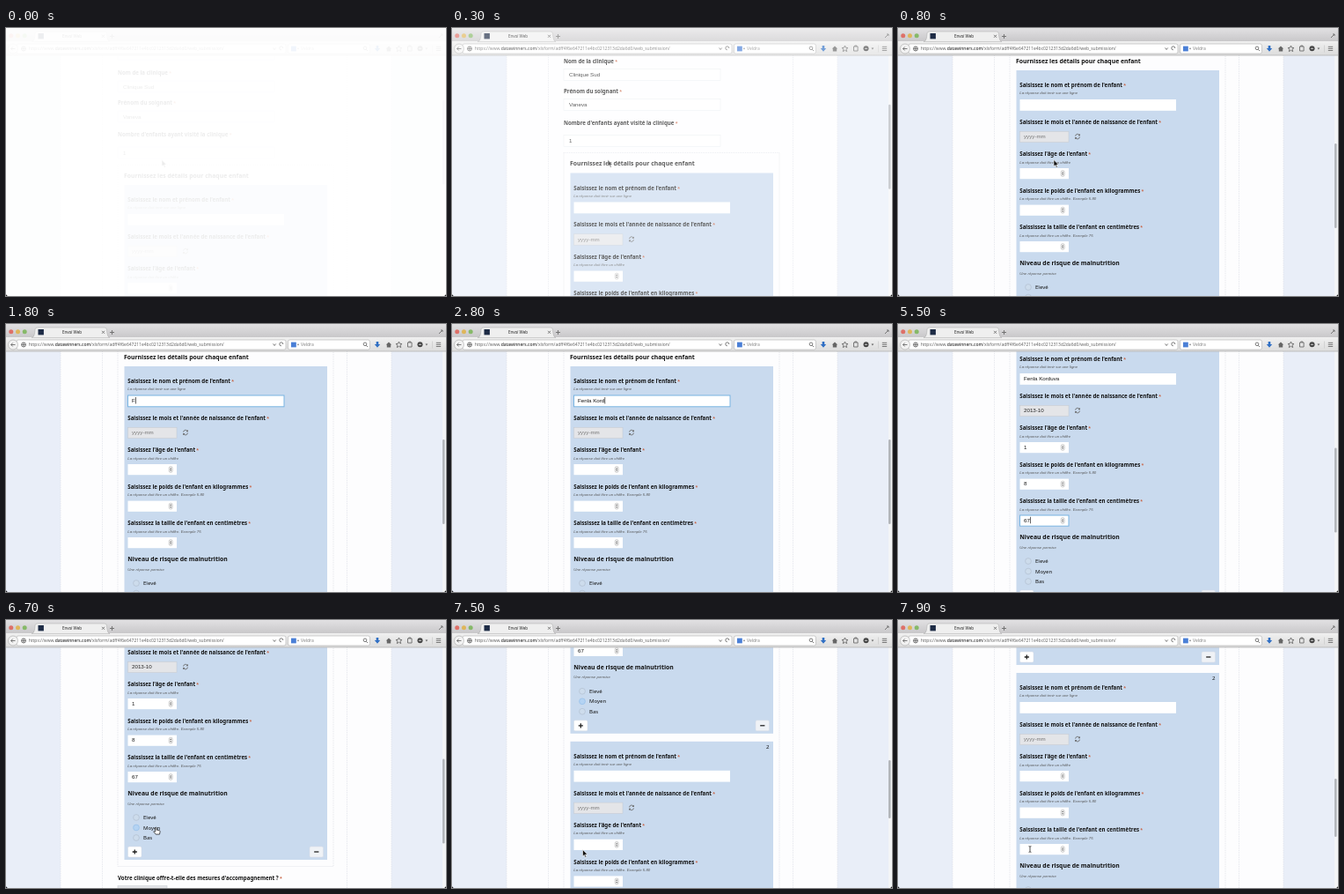
Recreate the animation shown at these times as an HTML page. Size 500x304 px, loop 8000 ms.

```html
<!DOCTYPE html>
<html lang="fr">
<head>
<meta charset="utf-8">
<title>Envoi Web</title>
<style>
html, body { margin: 0; width: 100%; height: 100%; overflow: hidden; background: #fff; }
svg { display: block; width: 500px; height: 304px; }
text { font-family: "Noto Sans", "Open Sans", sans-serif; fill: #111; white-space: pre; }
.head { font-size: 6.85px; font-weight: 700; }
.label { font-size: 6.13px; font-weight: 700; }
.star { fill: #c9603f; font-weight: 700; font-size: 5.2px; }
.hint { font: italic 4.37px "Liberation Sans", Arial, sans-serif; fill: #555; }
.value, .month { font: 6.2px "Liberation Sans", Arial, sans-serif; fill: #111; }
.month { font-size: 6px; text-anchor: middle; }
.bold { font-weight: 700; }
.option { font-size: 6px; }
.ui { font-size: 4.98px; fill: #666; }
.field { fill: #fff; }
.plain { stroke: #e4e7ec; stroke-width: .5; }
.date { fill: #e4e5e8; stroke: #c3c8d0; stroke-width: .5; }
.focus { stroke: #79b4e2; stroke-width: 1; }
.line { fill: none; stroke: #dcdfe6; stroke-width: .8; stroke-dasharray: 1 1; }
.icon { fill: none; stroke: #6b6b6b; stroke-width: .9; }
</style>
</head>
<body>
<svg viewBox="0 0 500 304" xmlns="http://www.w3.org/2000/svg">
  <defs>
    <linearGradient id="tabs" x2="0" y2="1"><stop stop-color="#e2e1e3"/><stop offset="1" stop-color="#c7c6c8"/></linearGradient>
    <linearGradient id="bar" x2="0" y2="1"><stop stop-color="#f0f0f0"/><stop offset="1" stop-color="#dcdcdc"/></linearGradient>
    <filter id="soft" x="-20%" y="-20%" width="140%" height="140%"><feDropShadow dx="0" dy="1" stdDeviation="1.5" flood-opacity=".35"/></filter>
  </defs>

  <rect width="500" height="304" fill="#e9eef8"/>
  <rect x="62" y="31" width="376" height="273" fill="#fdfdfe"/>
  <path class="line" d="M62 31V304M109.5 31V304M387.5 31V304M438 31V304"/>
  <g id="page"></g>

  <rect x="496" y="31" width="4" height="273" fill="#f3f4f6"/>
  <rect id="thumb" x="496" width="2.6" rx="1.3" fill="#b2b5ba"/>
  <g id="chrome"></g>

  <g id="arrow"><path d="M0 0V7.6L1.8 6L3 8.8L4.2 8.3L3 5.6H5.4Z" fill="#111" stroke="#fff" stroke-width=".6"/></g>
  <g id="hand"><path d="M-.7 .2Q0 -.6 .7 .2V2.6L4 3.3Q4.8 3.6 4.6 4.6L4 7.6H-.3L-2.8 4.4Q-2.4 3.4 -.7 4.6Z" fill="#fff" stroke="#111" stroke-width=".7"/></g>
  <g id="beam"><path d="M-1.4 -3.4Q0 -3.4 0 -2.6Q0 -3.4 1.4 -3.4M0 -2.6V2.6M-1.4 3.4Q0 3.4 0 2.6Q0 3.4 1.4 3.4" fill="none" stroke="#222" stroke-width=".8"/></g>

  <rect id="veil" width="500" height="304" fill="#fff"/>
  <path d="M0 302V304H2Q.4 303.6 0 302ZM500 302V304H498Q499.6 303.6 500 302Z"/>
</svg>

<script>
const $ = id => document.getElementById(id);
const text = (x, y, cls, str, extra = '') => `<text x="${x}" y="${y}" class="${cls}" ${extra}>${str}</text>`;
const label = (x, y, str) =>
  `<text x="${x}" y="${y}" class="label">${str}<tspan class="star" dx="1.2">*</tspan></text>`;
const field = (x, y, w, h, id = '', cls = '') =>
  `<rect x="${x}" y="${y}" width="${w}" height="${h}" class="field ${cls}" ${id && `id="${id}"`}/>`;
const slot = (id, y) => `<text x="143" y="${y}" class="value" id="${id}"></text>`;

// One numeric question: label, hint, field with spinner
const numeric = (key, y, title, example) =>
  label(138.3, y + 2.2, title) +
  text(138.3, y + 10.7, 'hint', 'La réponse doit être un chiffre' + example) +
  field(138.5, y + 16, 55.5, 12.2, key + 'Box') + slot(key, y + 23.8) +
  `<rect x="185.2" y="${y + 18.6}" width="4" height="6.8" rx="1.8" fill="#f1f1f1" stroke="#aaa" stroke-width=".5"/>
   <path d="M186.1 ${y + 21.4}l1.1 -1.5l1.1 1.5zM186.1 ${y + 22.6}l1.1 1.5l1.1 -1.5z" fill="#666"/>`;

const button = (x, sign, fill) =>
  `<rect x="${x}" y="327" width="15.5" height="12" rx="1.5" fill="${fill}" stroke="#d4dbe4" stroke-width=".5"/>
   <path d="M${x + 5.2} 333h5.2${sign === '+' ? 'm-2.6 -2.6v5.2' : ''}" stroke="#222" stroke-width="1.3"/>`;

// One block of questions about a child; n prefixes its ids
function child(n) {
  const radios = ['Elevé', 'Moyen', 'Bas'].map((name, i) => {
    const y = 294 + 11.5 * i;
    return `<circle cx="148" cy="${y}" r="3.4" fill="#cddcec" stroke="#b0bfd0" stroke-width=".7" id="${n}radio${i}"/>` +
      text(156, y + 2.2, 'option', name);
  }).join('');
  return `<rect x="134.5" y="48" width="230.5" height="294" fill="#c9daee"/>` +
    label(138.3, 67.2, "Saisissez le nom et prénom de l'enfant") +
    text(138.3, 75.4, 'hint', 'La réponse doit tenir sur une ligne') +
    field(138.5, 81, 177.5, 12.8, n + 'nameBox') + slot(n + 'name', 89) +
    label(138.3, 109, "Saisissez le mois et l'année de naissance de l'enfant") +
    field(138.5, 117.3, 55.5, 12.4, n + 'dateBox', 'date') + slot(n + 'date', 125.1) +
    `<path d="M201.6 122.6a2.4 2.4 0 0 1 4.4 -1.2M206.4 123.6a2.4 2.4 0 0 1 -4.4 1.2" class="icon"/>
     <path d="M206.9 119.9v2.4h-2.4zM201.1 126.3v-2.4h2.4z" fill="#666"/>` +
    numeric(n + 'age', 143, "Saisissez l'âge de l'enfant", '') +
    numeric(n + 'weight', 184.6, "Saisissez le poids de l'enfant en kilogrammes", '. Exemple 5.80') +
    numeric(n + 'height', 226, "Saississez la taille de l'enfant en centimètres", '. Exemple 75') +
    text(138.3, 268.8, 'head', 'Niveau de risque de malnutrition') +
    text(138.3, 279.7, 'hint', 'Une réponse permise') +
    radios + button(138.5, '+', '#fff') + button(345, '-', '#eff2f6');
}

const months = 'Jan Feb Mar Apr May Jun Jul Aug Sep Oct Nov Dec'.split(' ');
const picker = `<g id="picker">
  <path d="M140 131.5H143L145.5 129L148 131.5H224.5Q226 131.5 226 133V216.5Q226 218 224.5 218H140Q138.5 218 138.5 216.5V133Q138.5 131.5 140 131.5Z" fill="#fff" filter="url(#soft)"/>
  <rect id="hover" width="19" height="21" rx="2.5" fill="#e9e9ea"/>` +
  text(146, 140.4, 'month bold', '«') + text(182, 140.4, 'month bold', '2013') + text(218, 140.4, 'month bold', '»') +
  months.map((m, i) => text(152 + 20 * (i % 4), 159.6 + 22.8 * (i >> 2), 'month', m)).join('') + '</g>';

const intro = [[-79, 'Nom de la clinique', 'Clinique Sud'], [-45, 'Prénom du soignant', 'Vaneva'],
  [-9, "Nombre d'enfants ayant visité la clinique", '1']];

$('page').innerHTML =
  field(127, -107, 178, 13, '', 'plain') +
  intro.map(([y, title, value], i) => label(127, y + 2.2, title) +
    field(127, y + (i < 2 ? 9 : 14), 178, 13, '', 'plain') + text(133, y + (i < 2 ? 17.5 : 23), 'value', value)).join('') +
  `<rect id="outer" x="127" y="25" width="245" class="line"/>` +
  text(134, 39.6, 'head', 'Fournissez les détails pour chaque enfant') +
  child('a') +
  `<g id="second" transform="translate(0 303)">${child('b')}${text(357, 56, 'option', '2')}</g>` +
  text(339, 109, 'label', 'Required', 'id="required" style="font-size:5.3px"') +
  `<g id="after">${label(127, 365.3, "Votre clinique offre-t-elle des mesures d'accompagnement ?")}${field(127, 371.5, 56, 13, '', 'date')}</g>` +
  picker + '<rect id="caret" width=".7" height="7.5" fill="#222"/>';

$('chrome').innerHTML = `
  <rect width="500" height="16" fill="url(#tabs)"/>
  <rect y="15" width="500" height="16" fill="url(#bar)"/>
  <path d="M0 31H500" stroke="#b4b4b4" stroke-width=".8"/>
  <path d="M29 15.5Q32 15 32.5 11L33 6Q33.4 4 35.5 4H112Q114 4 114.4 6L115 11Q115.6 15 118 15.5Z" fill="#efefef" stroke="#aaa" stroke-width=".5"/>
  ${['#de7068', '#dfb65a', '#86b968'].map((c, i) => `<circle cx="${5.8 + 7.7 * i}" cy="8.8" r="2.5" fill="${c}"/>`).join('')}
  <rect x="36.5" y="6" width="6.4" height="6.4" fill="#1d2b45"/>
  <path d="M109 7.8l3 3m0 -3l-3 3M120.5 7v5m-2.5 -2.5h5M492 11l4 -4m-2 0h2v2" class="icon"/>
  ${text(64, 11.2, 'ui', 'Envoi Web', 'style="font-size:4.5px;fill:#222"')}
  <rect x="12" y="18" width="306" height="11" rx="2" fill="#fff" stroke="#b0b0b0" stroke-width=".6"/>
  <circle cx="8" cy="23.5" r="5.5" fill="#f2f2f2" stroke="#a8a8a8" stroke-width=".6"/>
  <path d="M10.5 23.5H5.7l2 -2m-2 2l2 2" class="icon"/>
  <circle cx="20" cy="23.5" r="2.5" class="icon"/><path d="M17.5 23.5h5M20 21v5" class="icon" stroke-width=".4"/>
  ${text(25.7, 25.2, 'ui', 'https://www.<tspan fill="#111">datawinners.com</tspan>/xlsform/adff4f6e647211e4bc0212313d2da6d0/web_submission/')}
  <path d="M303.5 22.5l1.6 2l1.6 -2M312.8 24.8a2 2 0 1 1 2 -1.8" class="icon"/>
  <rect x="320.5" y="18" width="93" height="11" rx="2" fill="#fff" stroke="#b0b0b0" stroke-width=".6"/>
  <rect x="324" y="20.6" width="5.8" height="5.8" fill="#4a7fd6"/>
  <path d="M330.8 22.8l1.2 1.6l1.2 -1.6z" fill="#777"/>
  ${text(335, 25.3, 'ui', 'Veldra', 'fill-opacity=".8"')}
  <circle cx="408" cy="22.8" r="1.8" class="icon"/><path d="M409.3 24.2l1.8 1.9" class="icon"/>
  <path d="M420.7 20h2.6v3h1.9l-3.2 3.7l-3.2 -3.7h1.9z" fill="#2f6fc4"/>
  <path d="M431.8 23.6l3.2 -3.2l3.2 3.2h-1v3h-4.4v-3z" fill="#666"/>
  <path d="M446.5 20l1 2.3l2.5 .2l-1.9 1.6l.6 2.5l-2.2 -1.3l-2.2 1.3l.6 -2.5l-1.9 -1.6l2.5 -.2z" class="icon" stroke-width=".7"/>
  <path d="M456.5 21h4.6v5h-4.6zm1.2 0v-1h2.2v1" class="icon"/>
  <circle cx="470.5" cy="23.3" r="3" fill="#444"/><path d="M469.1 23.3h2.8" stroke="#fff" stroke-width=".8"/>
  <path d="M476.5 22.6l1.4 1.8l1.4 -1.8z" fill="#666"/>
  <path d="M484.5 19.5v8" stroke="#c4c4c4" stroke-width=".6"/>
  <path d="M488.8 21.3h5.4m-5.4 2.1h5.4m-5.4 2.1h5.4" class="icon"/>`;

// Tracks are [time, value...]; values glide between neighbours
const scrolls = [[0, -130], [200, -130], [700, 0], [5200, 0], [5400, 25], [5700, 25], [6200, 70], [7200, 70], [7700, 291]];
const moves = [[0, 177, 149.5], [900, 177, 149.5], [1300, 170, 88], [3300, 170, 88], [3900, 158, 124], [4200, 158, 124],
  [4600, 165, 167.5], [4900, 172, 201], [5800, 180, 200], [6400, 170.5, 235.5], [6700, 170.5, 235.5],
  [7100, 147, 261], [7300, 147, 261], [7700, 150, 260]];
const veils = [[0, .92], [500, 0]];

function at(track, t, k = 1) {
  const i = track.findIndex(p => p[0] > t);
  if (i < 0) return track[track.length - 1][k];
  const [a, b] = [track[i - 1], track[i]];
  const u = (t - a[0]) / (b[0] - a[0]);
  return a[k] + (b[k] - a[k]) * u * u * (3 - 2 * u);
}

// Steps are [start, value]; the last one begun holds
const step = (list, t) => list.filter(p => p[0] <= t).pop()[1];
const focuses = [[0, ''], [1400, 'aname'], [4000, 'adate'], [5000, ''], [5100, 'aage'], [5200, 'aweight'], [5300, 'aheight'], [6600, '']];
const pointers = [[0, 'arrow'], [1200, 'beam'], [1600, ''], [3300, 'beam'], [3500, 'arrow'], [3800, 'beam'],
  [4300, 'hand'], [5100, ''], [5800, 'arrow'], [6300, 'hand'], [6800, 'arrow'], [7000, 'hand'], [7300, 'arrow'], [7600, 'beam']];
const fullName = 'Fenla Korduva';
const show = (id, on) => $(id).style.display = on ? '' : 'none';
const place = (id, x, y) => $(id).setAttribute('transform', `translate(${x} ${y})`);
const set = (id, attrs) => Object.entries(attrs).forEach(([k, v]) => $(id).setAttribute(k, v));

function draw(t) {
  const scroll = at(scrolls, t), added = t >= 7200;
  place('page', 0, -scroll);
  set('thumb', added ? { y: 180 - .27 * (291 - scroll), height: 66 } : { y: 131 + .38 * scroll, height: 96 });
  set('outer', { height: added ? 627.5 : 324.5 });
  show('second', added);
  place('after', 0, added ? 303 : 0);

  const picked = t >= 5000;
  const values = {
    aname: fullName.slice(0, Math.max(0, Math.floor((t - 1600) / 120))),
    adate: picked ? '2013-10' : 'yyyy-mm',
    aage: t >= 5100 ? '1' : '',
    aweight: t >= 5200 ? '8' : '',
    aheight: t >= 5400 ? '67' : t >= 5300 ? '6' : '',
    bdate: 'yyyy-mm'
  };
  for (const id in values) $(id).textContent = values[id];
  $('adate').style.fill = picked ? '#222' : '#777';
  $('bdate').style.fill = '#777';

  const active = step(focuses, t);
  for (const id of ['aname', 'adate', 'aage', 'aweight', 'aheight']) $(id + 'Box').classList.toggle('focus', id === active);
  show('caret', active);
  if (active) {
    const el = $(active);
    const typed = active !== 'adate' && values[active] ? el.getComputedTextLength() : 0;
    set('caret', { x: 143.2 + typed, y: el.getAttribute('y') - 6 });
  }

  const open = t >= 4000 && !picked;
  show('picker', open);
  show('required', open);
  set('hover', t < 4900 ? { x: 142.5, y: 147 } : { x: 162.5, y: 192.6 });
  set('aradio1', t >= 6600 ? { fill: '#b4d3f3', stroke: '#95bfe8' } : { fill: '#cddcec', stroke: '#b0bfd0' });

  const kind = step(pointers, t);
  for (const id of ['arrow', 'hand', 'beam']) show(id, id === kind);
  if (kind) place(kind, at(moves, t, 1), at(moves, t, 2));
  set('veil', { opacity: at(veils, t) });
}

const start = performance.now();
function tick() {
  draw(Math.floor((performance.now() - start) % 8000 / 100) * 100);
  requestAnimationFrame(tick);
}
tick();
</script>
</body>
</html>
```
